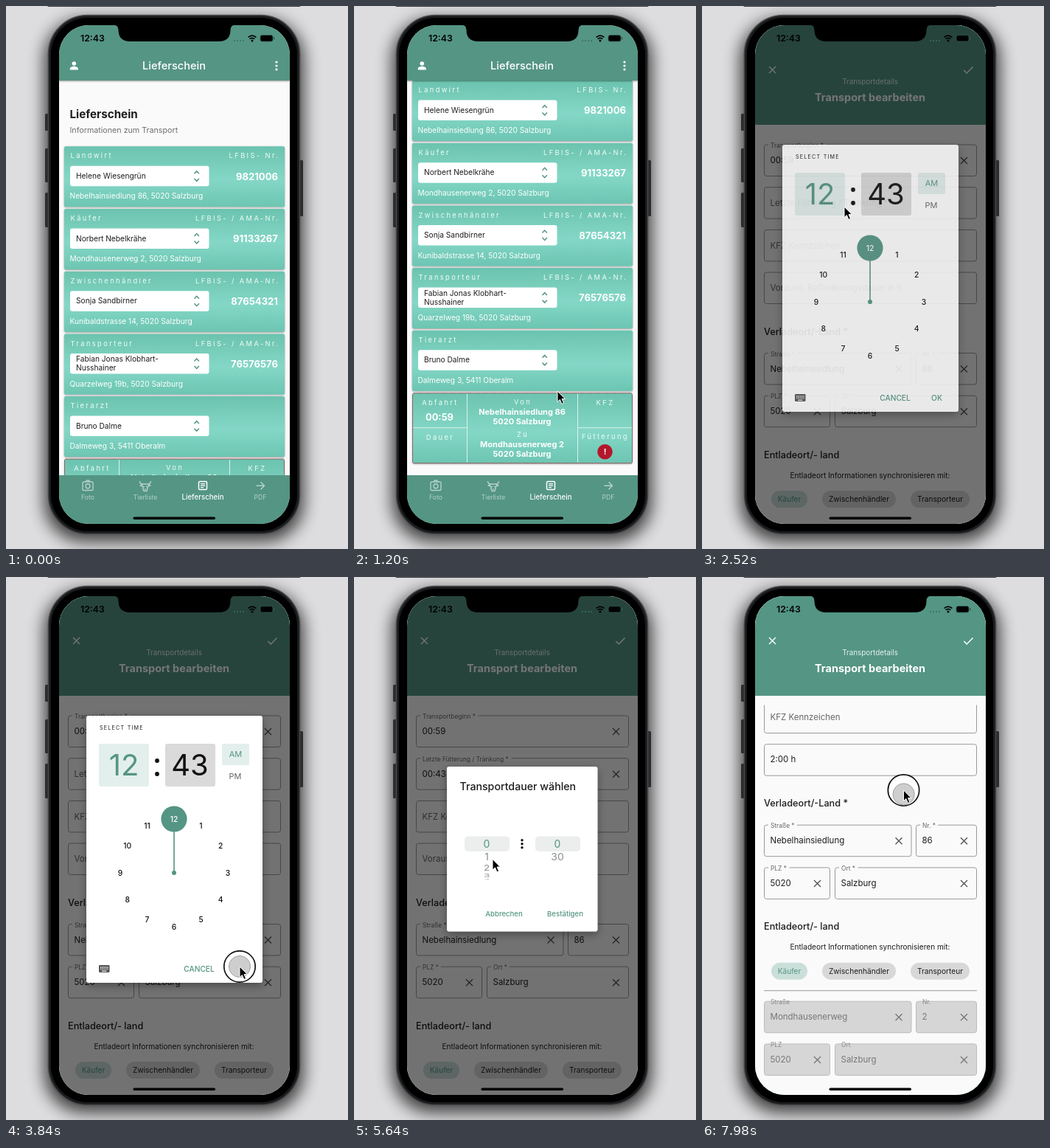
These frames come from a looping animation (464 px wide and 736 px high, 8000 ms). An HTML page:

```html
<!DOCTYPE html>
<html lang="de">
<head>
<meta charset="utf-8">
<title>Lieferschein</title>
<style>
  html, body { margin: 0; width: 100%; height: 100%; overflow: hidden; background: #dcdcde; }
  svg { display: block; width: 464px; height: 736px; font-family: Inter, "Open Sans", sans-serif; }
  text { white-space: pre; }
  .label { paint-order: stroke; stroke: #fafafa; stroke-width: 7px; }
</style>
</head>
<body>
<script>
const TEAL = '#549583', INK = '#1d1d1f', GREY = '#666';
const LOOP = 8000, STEP = 60;

// y is the middle of the capitals
function text(x, y, s, size, o = {}) {
  const { fill = INK, w = 400, a = 'start', ls = 0, cls = '' } = o;
  return `<text x="${x}" y="${(y + size * .36).toFixed(2)}" font-size="${size}" font-weight="${w}" fill="${fill}" text-anchor="${a}" letter-spacing="${ls}" class="${cls}">${s}</text>`;
}
const mid = (x, y, s, size, o) => text(x, y, s, size, { a: 'middle', ...o });
const rect = (x, y, w, h, r, fill, extra = '') =>
  `<rect x="${x}" y="${y}" width="${w}" height="${h}" rx="${r}" fill="${fill}" ${extra}/>`;
const dot = (x, y, r, fill, extra = '') => `<circle cx="${x}" cy="${y}" r="${r}" fill="${fill}" ${extra}/>`;
const line = (d, stroke, w = 1.3, extra = '') =>
  `<path d="${d}" fill="none" stroke="${stroke}" stroke-width="${w}" ${extra}/>`;
const cross = (x, y, r, stroke) =>
  line(`M${x - r} ${y - r}l${2 * r} ${2 * r}m0 ${-2 * r}l${-2 * r} ${2 * r}`, stroke, 1.4);

// ---- delivery note list ----
const CARDS = [
  ['Landwirt', 'LFBIS- Nr.', '9821006', ['Helene Wiesengrün'], 'Nebelhainsiedlung 86, 5020 Salzburg'],
  ['Käufer', 'LFBIS- / AMA-Nr.', '91133267', ['Norbert Nebelkrähe'], 'Mondhausenerweg 2, 5020 Salzburg'],
  ['Zwischenhändler', 'LFBIS- / AMA-Nr.', '87654321', ['Sonja Sandbirner'], 'Kunibaldstrasse 14, 5020 Salzburg'],
  ['Transporteur', 'LFBIS- / AMA-Nr.', '76576576', ['Fabian Jonas Klobhart-', 'Nusshainer'], 'Quarzelweg 19b, 5020 Salzburg'],
  ['Tierarzt', '', '', ['Bruno Dalme'], 'Dalmeweg 3, 5411 Oberalm']
];
const WHITE = { fill: '#fff' }, SPACED = { fill: '#f1fbf8', ls: 2.4 }, STRONG = { fill: '#fff', w: 700 };

function card([role, idLabel, id, name, address], i) {
  const y = 190.3 + i * 84.7;
  return rect(79, y, 299, 82, 2, 'url(#card)', 'filter="url(#soft)"') +
    text(87.5, y + 12.8, role, 9.3, SPACED) +
    text(371.4, y + 12.8, idLabel, 9.3, { ...SPACED, a: 'end' }) +
    rect(87, y + 26.5, 188.5, 27.5, 3, '#fff') +
    name.map((n, k) => text(95, y + 40 + (k - (name.length - 1) / 2) * 12, n, 10.2)).join('') +
    line(`M255.5 ${y + 37}l3.2 -3.4l3.2 3.4m-6.4 6.6l3.2 3.4l3.2 -3.4`, TEAL, 1.5) +
    text(369, y + 40.5, id, 13.1, { ...STRONG, a: 'end' }) +
    text(86.5, y + 67.5, address, 10.2, WHITE);
}

function tripCard(y) {
  const head = (x, dy, s) => mid(x + 1, y + dy, s, 9.3, SPACED);
  const bold = (x, dy, s, size = 11) => mid(x, y + dy, s, size, STRONG);
  return rect(79.5, y, 298, 95, 2, 'url(#card)', 'filter="url(#soft)"') +
    rect(79.5, y, 298, 95, 2, 'none', 'stroke="#8a3a40" stroke-dasharray="1.6 .6"') +
    line(`M153.5 ${y + 1}v93m150 0v-93M80 ${y + 47}h73m151 0h73`, '#d9f3ec', 1) +
    head(116, 12.5, 'Abfahrt') + bold(116, 33, '00:59', 12.8) + head(116, 60, 'Dauer') +
    head(228, 12, 'Von') + bold(228, 25.5, 'Nebelhainsiedlung 86') + bold(228, 38.8, '5020 Salzburg') +
    head(228, 55.5, 'Zu') + bold(228, 69.3, 'Mondhausenerweg 2') + bold(228, 82.5, '5020 Salzburg') +
    head(340, 12.5, 'KFZ') + head(340, 58.5, 'Fütterung') +
    dot(340.5, y + 79.5, 10.3, '#b3172c') + bold(340.5, 79.5, '!', 11);
}

const DIM = '#b3d1c8';
const listPage =
  rect(72, 26, 313, 676, 0, '#fafafa') +
  `<g clip-path="url(#listClip)"><g id="list">` +
  text(86.5, 147, 'Lieferschein', 15.2, { w: 700 }) +
  text(86.5, 168.5, 'Informationen zum Transport', 10.7, { fill: '#6f6f6f' }) +
  CARDS.map(card).join('') + tripCard(614) + `</g></g>` +
  rect(72, 26, 313, 75, 0, TEAL, 'filter="url(#soft)"') +
  mid(228, 81, 'Lieferschein', 14.6, { fill: '#fff', w: 500 }) +
  dot(92.3, 78, 2.8, '#fff') + `<path d="M86.8 86.4v-1.7c0-2 3.6-3 5.5-3s5.5 1 5.5 3v1.7z" fill="#fff"/>` +
  [76, 81, 86].map(y => dot(367, y, 1.6, '#fff')).join('') +
  rect(72, 636, 313, 66, 0, TEAL) +
  rect(104, 645, 14, 11.5, 1.5, 'none', `stroke="${DIM}" stroke-width="1.4"`) +
  line('M108 645l1.5 -2h3l1.5 2', DIM, 1.4) + dot(111, 650.7, 3, 'none', `stroke="${DIM}" stroke-width="1.4"`) +
  line('M181.5 644q0 4 4.5 4h6q4.5 0 4.5 -4M186 648l-3.5 2l3.5 1.5v3l1.2 3h3.6l1.2 -3v-3l3.5 -1.5l-3.5 -2M187.5 651v1m3 -1v1M188 655h2', DIM, 1.5) +
  rect(261.5, 644.5, 11, 11, 1.5, 'none', 'stroke="#fff" stroke-width="1.5"') +
  line('M264 647.7h6m-6 2.5h6m-6 2.5h4', '#fff', 1.3) +
  line('M339.5 650.3h11m-5 -5l5 5l-5 5', DIM, 1.5) +
  mid(111, 665.5, 'Foto', 8.6, { fill: DIM }) + mid(189, 665.5, 'Tierliste', 8.6, { fill: DIM }) +
  mid(267, 665.5, 'Lieferschein', 9.7, { fill: '#fff', w: 500 }) + mid(345, 665.5, 'PDF', 8.6, { fill: DIM });

// ---- transport form ----
function field(x, y, right, label, value, o = {}) {
  const { clear = true, off = false, id = '' } = o;
  return `<g id="${id}">` +
    rect(x + .5, y, right - x - 1, 42.5, 3, off ? '#d6d6d6' : 'none', `stroke="${off ? '#bbb' : '#999'}"`) +
    (label ? text(x + 9, y + 1, label, 8.4, { fill: off ? '#888' : GREY, cls: off ? '' : 'label' }) : '') +
    text(x + 8.5, y + 21, value, 11.5, { fill: off ? '#777' : label ? INK : GREY }) +
    (clear ? cross(right - 17.5, y + 21.5, 4.5, off ? '#777' : '#555') : '') + `</g>`;
}
function address(y, street, no, off) {
  const star = off ? '' : ' *';
  return field(84, y, 284.5, 'Straße' + star, street, { off }) + field(290, y, 373, 'Nr.' + star, no, { off }) +
    field(84, y + 57.7, 174, 'PLZ' + star, '5020', { off }) + field(180, y + 57.7, 373, 'Ort' + star, 'Salzburg', { off });
}
const chip = (x, w, s, bg, fill) => rect(x, 657, w, 23, 11.5, bg) + mid(x + w / 2, 668.5, s, 10.15, { fill });
const bare = id => ({ clear: false, id });

const formPage =
  rect(72, 26, 313, 676, 0, '#fafafa') +
  `<g clip-path="url(#formClip)"><g id="fields">` +
  field(84, 188, 373, 'Transportbeginn *', '00:59') +
  field(84, 245.7, 373, '', 'Letzte Fütterung / Tränkung *', bare('fedEmpty')) +
  field(84, 245.7, 373, 'Letzte Fütterung / Tränkung *', '00:43', { id: 'fedSet' }) +
  field(84, 303.4, 373, '', 'KFZ Kennzeichen', bare('')) +
  field(84, 361, 373, '', 'Vorauss. Beförderungsdauer in h', bare('spanEmpty')) +
  `<g id="spanSet">` + field(84, 361, 373, '', '', bare('')) + text(92.5, 381.5, '2:00 h', 11.5) + `</g>` +
  text(84, 441, 'Verladeort/-Land *', 12.7, { w: 500 }) + address(470.5, 'Nebelhainsiedlung', '86', false) +
  text(84, 608, 'Entladeort/- land', 12.7, { w: 500 }) +
  mid(228, 636, 'Entladeort Informationen synchronisieren mit:', 10.1) +
  chip(94, 49, 'Käufer', '#cbdfda', TEAL) + chip(163, 100, 'Zwischenhändler', '#d8d8d8', INK) +
  chip(283, 80, 'Transporteur', '#d8d8d8', INK) +
  line('M84 695h289', '#999', 1) + address(709.5, 'Mondhausenerweg', '2', true) + `</g></g>` +
  rect(72, 26, 313, 135, 0, TEAL) + cross(95.5, 86.5, 4.5, '#fff') + line('M355.3 87l4 4l8.2 -8.4', '#fff', 1.5) +
  mid(228, 102.5, 'Transportdetails', 9.9, { fill: '#e6f0ed' }) +
  mid(228, 123.5, 'Transport bearbeiten', 14.5, STRONG);

// ---- dialogs ----
const PALE = '#e3efec', ACTION = { fill: TEAL, w: 500 };
const hours = [...Array(12)].map((_, i) => {
  const a = i * Math.PI / 6;
  return mid(228 + 73 * Math.sin(a), 401 - 73 * Math.cos(a), i || 12, 10.3, { fill: i ? '#111' : '#fff', w: 500 });
}).join('');

const timeDialog =
  rect(109, 188, 239, 362, 3, '#fff', 'filter="url(#deep)"') +
  text(127, 204.5, 'SELECT TIME', 7.2, { ls: 1.2 }) +
  rect(126, 226, 68, 58, 3, PALE) + mid(160, 255, '12', 40, { fill: TEAL }) +
  dot(205, 249, 2.9, '#111') + dot(205, 267, 2.9, '#111') +
  rect(216, 226, 68, 58, 3, '#dadadb') + mid(249.5, 255, '43', 40, { fill: '#111' }) +
  rect(293, 226, 37, 29, 2, PALE) + mid(311.5, 240.5, 'AM', 11, { fill: TEAL }) + mid(311, 270, 'PM', 11, { fill: GREY }) +
  line('M228 401V328', TEAL, 1.6) + dot(228, 401, 3, TEAL) + dot(228, 328, 17.6, TEAL) + hours +
  rect(126, 526, 14.5, 10, 1.2, '#555') +
  line('M128 529h10.5m-10.5 2.4h10.5', '#fff', 1.3, 'stroke-dasharray="1.3 1"') + line('M130 534.2h6.5', '#fff', 1.2) +
  mid(262, 531, 'CANCEL', 10.2, ACTION) + mid(318.5, 531, 'OK', 10.2, ACTION);

const wheel = (cls, items) => items.map(n => `<g class="${cls}">${mid(0, 0, n, 14)}</g>`).join('');
const spanDialog =
  rect(126, 257, 204.5, 223.5, 3, '#fff', 'filter="url(#deep)"') +
  text(143.5, 284, 'Transportdauer wählen', 14.2, { w: 500 }) +
  rect(150, 351.5, 61, 20.5, 5, '#ebeeed') + rect(246, 351.5, 61, 20.5, 5, '#ebeeed') +
  wheel('hour', [...Array(9).keys()]) + wheel('minute', [0, 30]) +
  [356.7, 361.7, 366.7].map(y => dot(228, y, 1.7, '#111')).join('') +
  dot(295, 457, 14, PALE, 'id="hover"') +
  mid(203.5, 457, 'Abbrechen', 9.6, ACTION) + mid(286.5, 457, 'Bestätigen', 9.6, ACTION);

// ---- phone and stage ----
const clip = (id, x, y, w, h, r = 0) => `<clipPath id="${id}">${rect(x, y, w, h, r, '#000')}</clipPath>`;
const shadow = (id, dy, sd, op) =>
  `<filter id="${id}" x="-20%" y="-20%" width="140%" height="140%"><feDropShadow dx="0" dy="${dy}" stdDeviation="${sd}" flood-opacity="${op}"/></filter>`;

document.body.insertAdjacentHTML('afterbegin', `<svg viewBox="0 0 464 736">
<defs>
  <linearGradient id="card" x2="0" y2="1">
    <stop stop-color="#6bc3af"/><stop offset=".55" stop-color="#84d7c6"/><stop offset="1" stop-color="#6cc5b2"/>
  </linearGradient>
  ${clip('screen', 72, 26, 313, 676, 40)}${clip('listClip', 72, 101, 313, 535)}${clip('formClip', 72, 173.5, 313, 517)}
  ${shadow('soft', .8, 1.2, .45)}${shadow('deep', 4, 6, .35)}
  <filter id="blur" x="-20%" y="-20%" width="140%" height="140%"><feGaussianBlur stdDeviation="11"/></filter>
</defs>
${rect(0, 0, 464, 736, 0, '#dddddf')}
${rect(52, 18, 352, 708, 54, '#000', 'opacity=".72" filter="url(#blur)"')}
${rect(56, -4, 344, 5, 2, '#3a3a3c')}
${[[53, 146, 23], [53, 193, 46], [53, 253, 47], [398, 209, 76]].map(([x, y, h]) => rect(x, y, 5, h, 1.5, '#2b2c2e')).join('')}
${rect(57.5, 12.5, 341, 703, 53, '#1a1b1d', 'stroke="#47484b" stroke-width="1.6"')}
${rect(61, 16, 334, 696, 50, '#000')}
<g clip-path="url(#screen)">
  ${listPage}
  <g id="form">${formPage}</g>
  ${rect(72, 26, 313, 676, 0, '#000', 'id="shade"')}
  <g id="timeDlg">${timeDialog}</g>
  <g id="spanDlg">${spanDialog}</g>
</g>
<path d="M145 25.5q7.5 0 7.5 7q0 15.5 16 15.5h120q16 0 16 -15.5q0 -7 7.5 -7z" fill="#000"/>
${text(101, 44, '12:43', 12.3, { w: 600, fill: '#000' })}
${[310, 314, 318, 322].map(x => dot(x, 47, 1, '#3d6e60')).join('')}
${line('M328.6 42.4q5.4 -4.6 10.8 0M330.6 44.7q3.4 -2.8 6.8 0', '#000', 1.7)}${dot(334, 47, 1.5, '#000')}
${rect(345, 39.5, 17, 8.5, 2.6, '#000', 'stroke="#2f5b4e" stroke-width=".8"')}${rect(363, 42, 1.4, 3.4, .7, '#2f5b4e')}
${rect(172.5, 692.4, 111.5, 3.6, 1.8, '#000')}
<g id="ring">${dot(0, 0, 21.2, '#fff', 'fill-opacity=".75" stroke="#111" stroke-width="1.7"')}</g>
<g id="touch">${dot(0, 0, 14.6, '#c9c9c9', 'fill-opacity=".9" stroke="#a2a2a2"')}</g>
<path id="cursor" d="M0 0V14.6L3.4 11.5L5.9 17.4L8.5 16.3L6 10.6H10.4Z" fill="#000" stroke="#fff" stroke-width="1"/>
</svg>`);

// ---- motion ----
const $ = id => document.getElementById(id);
const part = (t, a, b) => Math.min(1, Math.max(0, (t - a) / (b - a)));
const out = (u, p = 2.5) => 1 - (1 - u) ** p;
const smooth = u => u * u * (3 - 2 * u);
const show = (id, on) => $(id).setAttribute('display', on ? 'inline' : 'none');
const move = (id, x, y) => $(id).setAttribute('transform', `translate(${x} ${y})`);
const fade = (id, o) => { show(id, o > 0); $(id).setAttribute('opacity', o); };

// time, x, y
const PATH = [
  [60, 290, 725], [240, 280, 614], [540, 276, 522], [1860, 276, 522], [2400, 193, 272], [3000, 193, 272],
  [3720, 317, 528], [4200, 317, 528], [4860, 202, 388], [5220, 202, 388], [5880, 182, 380], [6120, 182, 380],
  [6420, 181, 344], [6840, 296, 455], [7440, 296, 455], [7560, 277, 424], [7980, 273.5, 289]
];
const PRESSED = [[240, 540], [3720, 4200], [6120, 6420], [7560, 8000]];

function pointer(t) {
  const i = PATH.findIndex(k => k[0] > t);
  if (i < 0) return PATH[PATH.length - 1].slice(1);
  if (!i) return PATH[0].slice(1);
  const [a, b] = [PATH[i - 1], PATH[i]];
  const u = part(t, a[0], b[0]), e = a[0] === 7560 ? u : smooth(u);
  return [1, 2].map(k => a[k] + (b[k] - a[k]) * e);
}

function spin(cls, x, value) {
  document.querySelectorAll('.' + cls).forEach((g, i) => {
    const d = i - value, a = d * .37, near = Math.abs(d) < .5;
    g.setAttribute('display', Math.abs(a) < 1.5 ? 'inline' : 'none');
    g.setAttribute('transform', `translate(${x} ${361.7 + 48 * Math.sin(a)}) scale(1 ${Math.max(.05, Math.cos(a))})`);
    g.firstChild.setAttribute('fill', near ? TEAL : '#8c8c8c');
  });
}

function draw(t) {
  move('list', 0, -89.3 * smooth(part(t, 240, 600)));
  show('form', t > 1200);
  move('form', 0, 676 * (1 - out(part(t, 1200, 1680), 3)));
  move('fields', 0, -134.3 * part(t, 7560, 7980));

  const leave = part(t, 4140, 4380);
  const span = t >= 5040 && t < 7020;
  fade('timeDlg', out(part(t, 2430, 2600)) * (1 - leave));
  fade('spanDlg', span ? 1 : 0);
  fade('shade', .54 * (span ? 1 : out(part(t, 2400, 2520)) * (1 - leave)));
  show('fedEmpty', t < 4200); show('fedSet', t >= 4200);
  show('spanEmpty', t < 7020); show('spanSet', t >= 7020);
  show('hover', t >= 6840);
  spin('hour', 180, 2 * smooth(part(t, 6120, 6480)));
  spin('minute', 276, 0);

  const down = PRESSED.some(([a, b]) => t >= a && t < b);
  show('cursor', t >= 60); show('ring', down); show('touch', down);
  move('cursor', ...pointer(t));
  move('ring', ...pointer(t));
  move('touch', ...pointer(t - 17));
}

const start = performance.now();
(function tick() {
  const t = (performance.now() - start) % LOOP;
  draw(Math.floor(t / STEP) * STEP);
  requestAnimationFrame(tick);
})();
</script>
</body>
</html>
```
